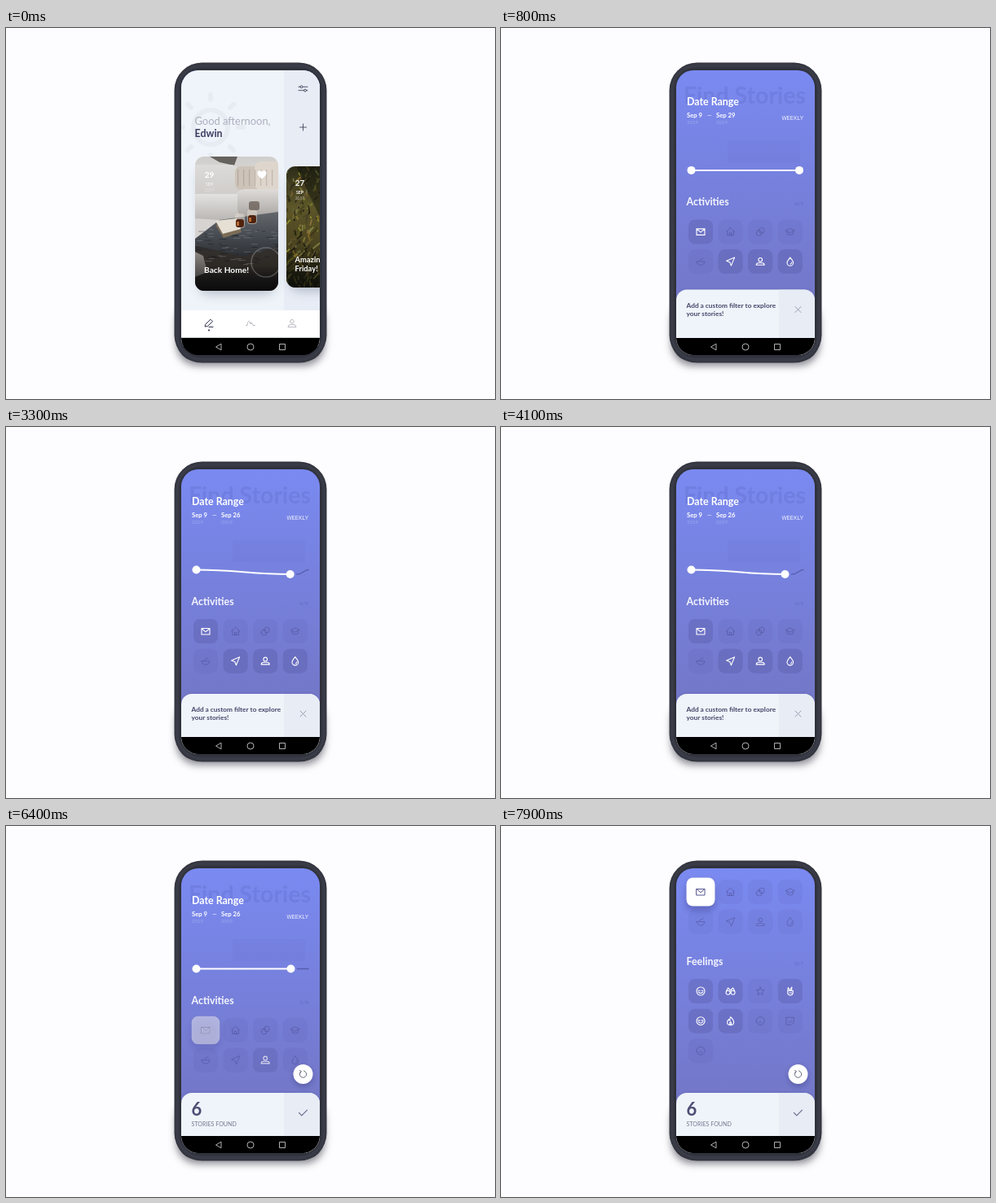
These frames come from a looping animation (600x456 px, 8 s). An HTML page with a canvas:

```html
<!DOCTYPE html>
<html lang="en">
<head>
<meta charset="utf-8">
<title>Story filter</title>
<style>
html, body { margin: 0; width: 100%; height: 100%; overflow: hidden; background: #fdfcfe; }
canvas { display: block; width: 600px; height: 456px; }
</style>
</head>
<body>
<canvas id="stage"></canvas>
<script>
const LOOP = 8000;
const canvas = document.getElementById('stage');
const ratio = window.devicePixelRatio || 1;
canvas.width = 600 * ratio;
canvas.height = 456 * ratio;
const c = canvas.getContext('2d');

const ICONS = {
  mail: 'M-5-3.5H5V4H-5ZM-5-3.5L0 .8L5-3.5',
  home: 'M-5 0L0-5L5 0M-3.8-1V4.5H3.8V-1M-1.2 4.5V1.5H1.2V4.5',
  rings: 'M-5 1.5a3.4 3.4 0 1 0 6.8 0a3.4 3.4 0 1 0-6.8 0M-1.8-1.5a3.4 3.4 0 1 0 6.8 0a3.4 3.4 0 1 0-6.8 0',
  cap: 'M-5.5-1.5L0-4L5.5-1.5L0 1ZM-3.5 0V3Q0 5 3.5 3V0',
  bowl: 'M-5 0H5Q4 4.5 0 4.5T-5 0M-2-1Q0-3 3-4',
  arrow: 'M5-5L-5-.8L-.8.8L.8 5Z',
  person: 'M-2.3-2.3a2.3 2.3 0 1 0 4.6 0a2.3 2.3 0 1 0-4.6 0M-5 4.2Q-5 1.6-2 1.6H2Q5 1.6 5 4.2Z',
  drop: 'M0-5Q-3.8-.5-3.8 1.4A3.8 3.8 0 0 0 3.8 1.4Q3.8-.5 0-5M.5 3Q2 2.5 2 1',
  smile: 'M-5 0a5 5 0 1 0 10 0a5 5 0 1 0-10 0M-3-.8H-1M1-.8H3M-2.8 1Q0 4 2.8 1',
  glasses: 'M-5.5 1.8a2.5 2.5 0 1 0 5 0a2.5 2.5 0 1 0-5 0M.5 1.8a2.5 2.5 0 1 0 5 0a2.5 2.5 0 1 0-5 0M-5-.5L-3-4L0-1L3-4L5-.5',
  star: 'M0-5L1.4-1.6L5-1.3L2.3 1L3.1 4.6L0 2.7L-3.1 4.6L-2.3 1L-5-1.3L-1.4-1.6Z',
  hand: 'M-3 0V3Q-2 5 0 5Q3.5 5 3.5 1V-.5H-3L-2.5-4.5L-.3-1L2-5L1.8-.5M-1 2H2',
  flame: 'M0-5Q4-1.5 4 1.5Q4 5 0 5T-4 1.5Q-4-.5-2-2Q-1.5-.5-.8-.5Q-1-3 0-5M0 5Q-2 3 0 1Q2 3 0 5',
  circle: 'M-5 0a5 5 0 1 0 10 0a5 5 0 1 0-10 0M-2 2Q0 0 2 2',
  square: 'M-4.5-4.5H4.5V1.5L1.5 4.5H-4.5ZM-2 1Q0 3 2 0',
  filter: 'M-5.5-2.2H-3.6M-.6-2.2H5.5M-3.6-2.2a1.5 1.5 0 1 0 3 0a1.5 1.5 0 1 0-3 0M-5.5 2.2H1M4 2.2H5.5M1 2.2a1.5 1.5 0 1 0 3 0a1.5 1.5 0 1 0-3 0',
  plus: 'M-4 0H4M0-4V4',
  close: 'M-3.5-3.5L3.5 3.5M3.5-3.5L-3.5 3.5',
  check: 'M-5 0L-1.6 3.4L5-3.4',
  reset: 'M-2.5-3.4A4.2 4.2 0 1 0 1-4.1M-4-4.5L-2.3-3.5L-3.2-1.5',
  pencil: 'M-4 1L2-4.8L4.5-2.3L-1.5 3.5L-4.5 4ZM0 4.5H5',
  pulse: 'M-5.5 2.5H-4Q-3-3-1.8-3T0 1L1.2-1L3 2.5H5.5',
  heart: 'M0 5Q-5.5 1-5.5-2A2.8 2.8 0 0 1 0-3A2.8 2.8 0 0 1 5.5-2Q5.5 1 0 5Z'
};
for (const name in ICONS) ICONS[name] = new Path2D(ICONS[name]);

const clamp = v => Math.max(0, Math.min(1, v));
const ramp = (t, from, to) => clamp((t - from) / (to - from));
const mix = (a, b, p) => a + (b - a) * p;
const ease = p => p < .5 ? 4 * p ** 3 : 1 - 4 * (1 - p) ** 3;
const smooth = p => p * p * (3 - 2 * p);

function layer(draw, alpha = 1, dx = 0, dy = 0) {
  if (alpha <= 0) return;
  c.save();
  c.globalAlpha *= alpha;
  c.translate(dx, dy);
  draw();
  c.restore();
}

function box(x, y, w, h, r, fill) {
  c.beginPath();
  c.roundRect(x, y, w, h, r);
  if (fill) { c.fillStyle = fill; c.fill(); }
}

function disc(x, y, r, fill) {
  c.beginPath();
  c.arc(x, y, r, 0, 7);
  c.fillStyle = fill;
  c.fill();
}

function poly(fill, ...points) {
  c.beginPath();
  points.forEach(p => c.lineTo(...p));
  c.fillStyle = fill;
  c.fill();
}

function stroke(path, color, width) {
  c.strokeStyle = color;
  c.lineWidth = width;
  c.lineCap = c.lineJoin = 'round';
  c.stroke(path);
}

const icon = (name, x, y, color, alpha = 1, width = 1) =>
  layer(() => stroke(ICONS[name], color, width), alpha, x, y);

function text(str, x, y, size, color, weight = 400, align = 'left', family = 'Lato') {
  c.font = `${weight} ${size}px ${family}, sans-serif`;
  c.textAlign = align;
  c.fillStyle = color;
  c.fillText(str, x, y);
}

function vertical(y0, y1, ...colors) {
  const g = c.createLinearGradient(0, y0, 0, y1);
  colors.forEach((color, i) => g.addColorStop(i / (colors.length - 1), color));
  return g;
}

let seed = 7;
const random = () => (seed = seed * 16807 % 2147483647) / 2147483647;
const grass = Array.from({ length: 260 }, () => ({
  x: 342 + random() * 48, y: 165 + random() * 155, len: 2 + random() * 6, lean: random() * 2 - 1.3,
  color: `hsl(${40 + random() * 22} ${25 + random() * 30}% ${8 + random() * 32}%)`
}));
const scratches = Array.from({ length: 70 }, () => ({
  x: 232 + random() * 102, y: 246 + random() * 45, len: 2 + random() * 8, shade: random()
}));

function sofaPhoto() {
  c.fillStyle = vertical(158, 255, '#d0cecc', '#e2e0de', '#c9c6c4');
  c.fillRect(232, 158, 102, 165);
  poly('#66635f', [250, 158], [284, 158], [280, 169], [262, 165]);
  box(222, 168, 66, 38, 12, vertical(168, 206, '#dddbd9', '#cfccca'));
  box(281, 170, 32, 29, 7, '#cdc3b8');
  box(305, 164, 36, 35, 8, '#ded6cc');
  for (let i = 0; i < 7; i++) {
    c.fillStyle = 'rgba(125,108,92,.3)';
    c.fillRect(284 + i * 7, 174, 1.2, 20);
  }
  box(222, 204, 68, 33, 10, vertical(204, 237, '#e4e2e0', '#b8b5b3'));
  box(284, 198, 60, 34, 9, vertical(198, 232, '#dedbd8', '#aaa6a3'));
  poly('#d6d3d1', [232, 234], [262, 236], [246, 262], [232, 268]);
  poly(vertical(228, 285, '#62666b', '#454a50', '#2a2c30'), [232, 259], [262, 236], [334, 226], [334, 272], [290, 285], [232, 267]);
  poly(vertical(262, 323, '#2a2a2c', '#3b352e', '#131315'), [232, 267], [290, 281], [334, 268], [334, 323], [232, 323]);
  poly('#8c8782', [232, 275], [242, 280], [247, 300], [232, 306]);
  c.fillStyle = vertical(275, 323, 'rgba(10,10,12,0)', 'rgba(10,10,12,.8)');
  c.fillRect(232, 275, 102, 48);
  for (const s of scratches) {
    c.fillStyle = s.shade > .5 ? 'rgba(190,195,200,.25)' : 'rgba(8,10,15,.35)';
    c.fillRect(s.x, s.y, s.len, 1);
  }
  poly('#7c6c55', [257, 242], [285, 238], [289, 251], [267, 258]);
  poly('#e6dfd4', [257, 237], [283, 234], [288, 247], [266, 253]);
  for (const [x, y] of [[287, 236], [302, 231]]) {
    box(x - 6, y - 8, 12, 18, 4, 'rgba(225,215,205,.55)');
    box(x - 5, y - 1, 10, 10, 3, '#50230f');
    c.fillStyle = '#b86b32';
    c.fillRect(x - 4, y + 2, 3, 5);
  }
  box(298, 213, 13, 11, 3, 'rgba(72,57,46,.55)');
}

function grassPhoto() {
  c.fillStyle = vertical(170, 319, '#2c2c18', '#5d5629', '#49421f', '#17180e');
  c.fillRect(344, 170, 102, 149);
  for (const g of grass) {
    c.beginPath();
    c.moveTo(g.x, g.y);
    c.lineTo(g.x + g.len * g.lean, g.y + g.len);
    c.strokeStyle = g.color;
    c.lineWidth = 1.8;
    c.stroke();
  }
  poly('rgba(18,20,12,.5)', [356, 170], [385, 170], [385, 232], [372, 205]);
  c.fillStyle = vertical(265, 319, 'rgba(10,12,8,0)', 'rgba(10,12,8,.75)');
  c.fillRect(344, 265, 60, 54);
}

function card(x, y, h, paint) {
  layer(() => {
    c.shadowColor = 'rgba(50,60,90,.3)';
    c.shadowBlur = 14 * ratio;
    c.shadowOffsetY = 6 * ratio;
    box(x + 5, y + 10, 92, h - 12, 11, '#777');
  });
  layer(() => {
    box(x, y, 102, h, 11);
    c.clip();
    paint();
  });
}

function dateLabel(x, y, day, alpha) {
  text(day, x, y, 10, '#fff', 700, 'center');
  layer(() => {
    text('SEP', x, y + 10, 5.2, '#fff', 700, 'center');
    text('2019', x, y + 17, 5, 'rgba(255,255,255,.6)', 400, 'center');
  }, alpha);
}

function home() {
  layer(() => {
    c.strokeStyle = '#dfe5ee';
    c.lineCap = 'round';
    c.lineWidth = 6;
    c.beginPath();
    c.arc(251, 122, 21, 0, 7);
    c.stroke();
    for (let i = 0; i < 8; i++) {
      const a = i * Math.PI / 4;
      c.beginPath();
      c.moveTo(251 + 34 * Math.cos(a), 122 + 34 * Math.sin(a));
      c.lineTo(251 + 40 * Math.cos(a), 122 + 40 * Math.sin(a));
      c.stroke();
    }
  }, .5);
  text('Good afternoon,', 231.5, 118.5, 12.9, '#adafbd');
  text('Edwin', 231.5, 133.5, 12.4, '#3b3c60', 700);
  icon('plus', 364.5, 122, '#45465d', 1, .9);
  card(232, 158, 165, () => {
    sofaPhoto();
    c.strokeStyle = 'rgba(255,255,255,.22)';
    c.lineWidth = 1.6;
    c.beginPath();
    c.arc(319, 288, 18, 0, 7);
    c.stroke();
    dateLabel(249.5, 184, '29', .65);
    layer(() => { c.fillStyle = '#fff'; c.fill(ICONS.heart); }, 1, 314, 180.5);
    text('Back Home!', 243, 301, 10.2, '#fff', 700);
  });
  card(344, 170, 149, () => {
    grassPhoto();
    dateLabel(360.5, 193.5, '27', .95);
    text('Amazing', 354.5, 288, 9.4, '#fff', 700);
    text('Friday!', 354.5, 298.5, 9.4, '#fff', 700);
  });
}

function tabBar(t) {
  const slide = 36 * ease(ramp(t, 400, 780));
  layer(() => {
    c.fillStyle = '#fff';
    c.fillRect(215, 347, 170, 40);
    icon('pencil', 249, 363, '#30314a');
    disc(249, 371.5, 1.1, '#30314a');
    icon('pulse', 300, 363, '#b3b4bd', 1, .9);
    icon('person', 351, 363, '#b3b4bd', 1, .9);
  }, 1, 0, slide);
  layer(() => {
    c.fillStyle = '#c3d0cc';
    c.fillRect(215, 380, 170, 1);
  }, 1 - ramp(t, 600, 800));
}

// The sheet is the home page itself, pushed down until only its head remains.
function sheet(t, offset) {
  const flip = smooth(ramp(t, 4300, 4750));
  const radius = 13 * ramp(t, 500, 780);
  layer(() => {
    c.beginPath();
    c.roundRect(215, 51, 170, 340, [radius, radius, 0, 0]);
    c.shadowColor = 'rgba(60,60,130,.2)';
    c.shadowBlur = 4 * ratio;
    c.fillStyle = '#eff4fa';
    c.fill();
    c.shadowColor = 'transparent';
    c.clip();
    c.fillStyle = '#e7ecf5';
    c.fillRect(341, 51, 44, 340);
    if (offset < 270) home();
    const hint = mix(.2 * ramp(t, 350, 500), 1, ramp(t, 500, 780)) * (1 - flip);
    layer(() => {
      text('Add a custom filter to explore', 227.5, 73, 8.3, '#444668', 700);
      text('your stories!', 227.5, 83, 8.3, '#444668', 700);
    }, hint);
    const swap = ramp(t, 550, 780);
    icon('filter', 364.5, 74.5, '#45465d', 1 - swap, .9);
    icon('close', 364.5, 75.5, '#9c9fb0', swap * (1 - flip));
    icon('check', 364.5, 75.5, '#6b6d8e', flip, 1.1);
    layer(() => {
      const drop = smooth(ramp(t, 5900, 6200));
      layer(() => text('8', 227.5, 79, 22, '#4c4d74', 700), 1 - drop, 0, -6 * drop);
      layer(() => text('6', 227.5, 79, 22, '#4c4d74', 700), drop, 0, 6 * (1 - drop));
      text('STORIES FOUND', 227.5, 92, 7.1, '#74768f');
    }, flip);
  }, 1, 0, offset);
}

function tile(name, x, y, bright, selected = 0, grow = 0) {
  const size = 30 + 5 * grow;
  box(x - size / 2, y - size / 2, size, size, 8, `rgba(72,72,145,${mix(.08, .25, bright)})`);
  icon(name, x, y, '#50539c', .6 * (1 - bright));
  icon(name, x, y, '#fff', bright * (1 - selected), 1.1);
  layer(() => {
    c.shadowColor = 'rgba(50,50,120,.4)';
    c.shadowBlur = 9 * ratio;
    c.shadowOffsetY = 5 * ratio;
    box(x - size / 2, y - size / 2, size, size, 8, '#fff');
    c.shadowColor = 'transparent';
    icon(name, x, y, '#55578f');
  }, selected);
}

function slider(t) {
  const dragX = mix(366, 348.5, 1 - (1 - ramp(t, 2350, 3900)) ** 4.6);
  const x = mix(dragX, 349.5, smooth(ramp(t, 4150, 4500)));
  const since = Math.max(0, t - 4150);
  const sag = 5.5 * smooth(ramp(t, 2350, 2950)) * Math.exp(-since / 170) * Math.cos(since / 75);
  const base = 175.5, y = base + sag;
  if (x < 365) {
    const start = Math.min(x + 8, 369);
    stroke(new Path2D(`M${start} ${y}C${start + 8} ${y} 365 ${base} 371 ${base}`), 'rgba(68,70,140,.6)', 1.4);
  }
  stroke(new Path2D(`M233.5 ${base}C285 ${base} 298 ${y} ${x} ${y}`), '#fff', 2);
  disc(233.5, base, 5, '#fff');
  disc(x, y, 5, '#fff');
  return Math.floor(9 + 20 * (x - 233.5) / 132.5);
}

function section(title, y, count) {
  text(title, 227.5, y, 12.4, 'rgba(255,255,255,.93)', 700);
  text(count, 371, y, 6.5, 'rgba(65,67,140,.35)', 400, 'right');
}

function filters(t) {
  text('Find Stories', 224, 93.5, 28.5, 'rgba(70,75,165,.17)', 700);
  box(278, 139, 89, 27, 2, 'rgba(70,72,150,.06)');
  text('Date Range', 228, 96, 12.4, '#fff', 700);
  const day = slider(t);
  text('Sep 9', 228, 110.5, 7.7, '#fff', 700);
  text('—', 253, 110.5, 7.2, '#fff');
  text('Sep ' + day, 264, 110.5, 7.7, '#fff', 700);
  for (const x of [228, 264]) text('2019', x, 118.8, 6, 'rgba(255,255,255,.28)');
  text('WEEKLY', 371, 114, 6.5, 'rgba(255,255,255,.9)', 400, 'right', 'Liberation Sans');

  const selected = ramp(t, 6180, 6640);
  const grow = smooth(ramp(t, 5900, 6500));
  section('Activities', 219, selected ? '1/5' : '0/5');
  const spare = 1 - ramp(t, 5050, 5400);
  const last = 1 - ramp(t, 6250, 6850);
  const column = i => 245 + 36.6 * (i % 4);
  const row = i => 36.7 * Math.floor(i / 4);
  const activities = { mail: 1, home: 0, rings: 0, cap: 0, bowl: 0, arrow: spare, person: last, drop: spare };
  Object.entries(activities).forEach(([name, bright], i) => {
    const mail = name === 'mail';
    tile(name, column(i), 251 + row(i), bright, mail ? selected : 0, mail ? grow : 0);
  });

  section('Feelings', 341, '0/7');
  const feelings = [['smile', 1], ['glasses', 1], ['star', 0], ['hand', 1], ['smile', 1],
    ['flame', 1], ['circle', 0], ['square', 0], ['circle', 0]];
  feelings.forEach(([name, bright], i) => tile(name, column(i), 373 + row(i), bright));
}

function resetButton(t) {
  const p = smooth(ramp(t, 4500, 4950));
  layer(() => {
    c.scale(mix(.4, 1, p), mix(.4, 1, p));
    c.shadowColor = 'rgba(50,50,110,.4)';
    c.shadowBlur = 7 * ratio;
    c.shadowOffsetY = 3 * ratio;
    disc(0, 0, 12, '#fff');
    c.shadowColor = 'transparent';
    icon('reset', 0, 0, '#686a80');
  }, p, 364.5, 305);
}

function phoneBody() {
  layer(() => {
    c.shadowColor = 'rgba(40,42,55,.55)';
    c.shadowBlur = 10 * ratio;
    c.shadowOffsetY = 5 * ratio;
    box(209, 330, 182, 80, 26, '#33353f');
  });
  box(206.5, 42.5, 187, 369, 34, '#343640');
  box(208.5, 44.5, 183, 365, 32, '#393c46');
  box(212, 48.5, 176, 357, 27, '#30323c');
}

function systemBar() {
  c.fillStyle = '#000';
  c.fillRect(215, 381, 170, 22);
  c.strokeStyle = '#c4c4c4';
  c.lineWidth = .9;
  c.stroke(new Path2D('M257.5 392L264 388.2V395.8ZM335.5 388.5H342.5V395.5H335.5ZM296 392a4 4 0 1 0 8 0a4 4 0 1 0-8 0'));
}

function draw(t) {
  c.setTransform(ratio, 0, 0, ratio, 0, 0);
  c.fillStyle = '#fdfcfe';
  c.fillRect(0, 0, 600, 456);
  phoneBody();
  layer(() => {
    box(215, 52, 170, 350, 21);
    c.clip();
    const open = ease(ramp(t, 305, 910));
    c.fillStyle = vertical(52, 335, '#7a8af1', '#7377c8');
    c.fillRect(215, 52, 170, 330);
    const scroll = 170 * ease(ramp(t, 7060, 7860));
    const shown = ramp(t, 480, 770);
    layer(() => filters(t), shown, 0, -26 * (1 - open) - scroll);
    resetButton(t);
    sheet(t, 277 * open);
    tabBar(t);
    systemBar();
  });
}

function tick() {
  draw(performance.now() % LOOP);
  requestAnimationFrame(tick);
}
tick();
</script>
</body>
</html>
```
